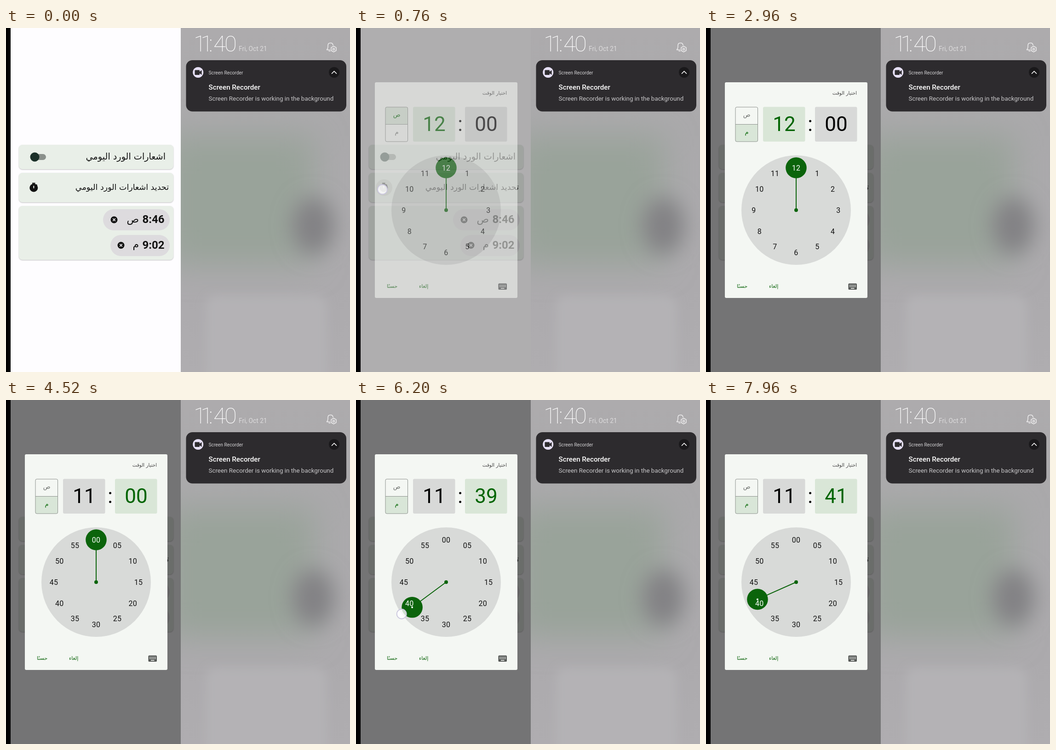
These frames come from a looping animation (748 by 748 pixels, 8 s). An HTML page:

```html
<!DOCTYPE html>
<html lang="ar">
<head>
<meta charset="utf-8">
<title>Time picker</title>
<style>
  html, body { margin: 0; width: 100%; height: 100%; overflow: hidden; background: #000; }
  svg { display: block; width: 748px; height: 748px; font-family: Roboto, "DejaVu Sans", sans-serif; }
  .ar { font-family: "DejaVu Sans", sans-serif; }
  .card { fill: #e9efe8; filter: drop-shadow(0 1px 1px rgba(0, 0, 0, .25)); }
  .chip { fill: #dddbde; }
  .mid { text-anchor: middle; }
  .end { text-anchor: end; }
  .big { font-size: 44px; text-anchor: middle; }
  .line { fill: none; stroke-linecap: round; stroke-linejoin: round; }
  .labels { font-size: 16px; text-anchor: middle; letter-spacing: .3px; }
</style>
</head>
<body>
<svg viewBox="0 0 748 748">
  <defs>
    <filter id="soft" x="-60%" y="-60%" width="220%" height="220%"><feGaussianBlur stdDeviation="34"/></filter>
    <filter id="softer" x="-80%" y="-80%" width="260%" height="260%"><feGaussianBlur stdDeviation="23"/></filter>
    <filter id="edge" x="-30%" y="-30%" width="160%" height="160%"><feGaussianBlur stdDeviation="10"/></filter>
    <linearGradient id="wall" x2="0" y2="1">
      <stop offset="0" stop-color="#adabad"/>
      <stop offset=".3" stop-color="#aaa9ab"/>
      <stop offset=".75" stop-color="#acaaad"/>
      <stop offset="1" stop-color="#afadb0"/>
    </linearGradient>
    <clipPath id="rightHalf"><path d="M380 0H748V748H380z"/></clipPath>
    <clipPath id="knobClip"><circle class="knob" r="22.8"/></clipPath>
    <g id="remove">
      <circle r="7.5" fill="#111"/>
      <path d="M-2.8-2.8 2.8 2.8M2.8-2.8-2.8 2.8" stroke="#e5e3e6" stroke-width="1.7"/>
    </g>
  </defs>

  <!-- settings screen -->
  <path d="M10 0H380V748H10z" fill="#fefdff"/>
  <rect class="card" x="28" y="254" width="336" height="53" rx="8"/>
  <rect class="card" x="28" y="315" width="336" height="64" rx="8"/>
  <rect class="card" x="28" y="387" width="336" height="117" rx="8"/>
  <rect x="55" y="274" width="32" height="13" rx="6.5" fill="#8a908b"/>
  <circle cx="62.5" cy="280.5" r="10" fill="#1b3029"/>
  <g fill="#111">
    <text class="ar end" x="347" y="286" font-size="19.2">اشعارات الورد اليومي</text>
    <text class="ar end" x="354" y="352" font-size="17.5">تحديد اشعارات الورد اليومي</text>
    <circle cx="60.3" cy="347.5" r="9"/>
    <path d="M57 336.500h6.500v2.200H57zM66 339.500l2.300 2.300-1.500 1.500-2.300-2.300z"/>
    <path d="M60.300 343v5.500" stroke="#e9efe8" stroke-width="2"/>
    <rect class="chip" x="211" y="394" width="145" height="46" rx="23"/>
    <rect class="chip" x="227" y="450" width="129" height="46" rx="23"/>
    <g font-size="24" font-weight="700" class="end">
      <text x="344.500" y="424">8:46</text>
      <text x="344.500" y="479.500">9:02</text>
    </g>
    <g class="ar end" font-size="22">
      <text x="289" y="423">ص</text>
      <text x="289" y="478">م</text>
    </g>
    <use href="#remove" x="235" y="417"/>
    <use href="#remove" x="250" y="472.500"/>
  </g>
  <circle id="ripple" cx="61" cy="347" r="18" fill-opacity=".13"/>
  <path id="scrim" d="M10 0H380V748H10z"/>

  <!-- picker dialog -->
  <g id="dialog">
    <rect x="41" y="118" width="310" height="469" rx="3" fill="#f4f7f3"/>
    <text class="ar end" x="328" y="145" font-size="10.300" fill="#444">اختيار الوقت</text>
    <path id="half" fill="#d9e6d8"/>
    <rect x="64" y="172" width="48.500" height="75" rx="3" fill="none" stroke="#8d918d"/>
    <path d="M64 209.500h48.500" stroke="#8d918d"/>
    <g class="ar mid" font-size="13">
      <text id="am" x="88.500" y="193">ص</text>
      <text id="pm" x="88.500" y="231">م</text>
    </g>
    <rect id="hourBox" x="124" y="171.500" width="91.500" height="75.500" rx="3"/>
    <rect id="minuteBox" x="237" y="171.500" width="91.500" height="75.500" rx="3"/>
    <text id="hour" class="big" x="170" y="224"></text>
    <text id="minute" class="big" x="283" y="224"></text>
    <text class="big" x="226.500" y="224">:</text>
    <circle cx="196" cy="396" r="119" fill="#d8dad8"/>
    <g class="labels" fill="#111"></g>
    <g fill="#0b640b">
      <path id="hand" stroke="#0b640b" stroke-width="2"/>
      <circle cx="196" cy="396" r="4"/>
      <circle class="knob" r="22.800"/>
    </g>
    <g clip-path="url(#knobClip)"><g class="labels" fill="#fff"></g></g>
    <circle id="pip" class="knob" r="2" fill="#fff"/>
    <g class="ar" font-size="11" fill="#0b640b">
      <text x="67" y="565">حسنًا</text>
      <text x="137" y="565">إلغاء</text>
    </g>
    <rect x="309.500" y="555.500" width="18.500" height="13.500" rx="1.800" fill="#555856"/>
    <path d="M312 559.300h14M312 562.400h14" stroke="#f4f7f3" stroke-width="1.700" stroke-dasharray="1.800 1.200"/>
    <path d="M315 566.200h7.500" stroke="#f4f7f3" stroke-width="1.700"/>
  </g>
  <circle id="touch" r="10.500" fill="#fff" fill-opacity=".8" stroke="#cbc7de" stroke-width="1.800"/>

  <!-- notification shade -->
  <g clip-path="url(#rightHalf)">
    <path d="M380 0H748V748H380z" fill="url(#wall)"/>
    <rect x="345" y="235" width="325" height="280" fill="#99a39a" filter="url(#soft)"/>
    <ellipse cx="668" cy="430" rx="45" ry="62" fill="#828184" filter="url(#softer)"/>
    <rect x="435" y="582" width="262" height="220" rx="22" fill="#b4b2b5" filter="url(#edge)"/>
  </g>
  <g fill="#fff">
    <text x="408 423 441 451 475" y="51" font-size="49" font-weight="200">11:40</text>
    <text x="506" y="50" font-size="13.800" fill="#dddcdd">Fri, Oct 21</text>
    <g class="line" stroke="#efeeef" stroke-width="1.500">
      <path d="M704 47.500H697.500Q700 45 700 41V38Q700 32.500 705.500 32.500T711 37.500M702 50h3"/>
      <path d="M712.500 39.500 718 42.700V49L712.500 52 707 49V42.700z"/>
      <circle cx="712.500" cy="46" r="2"/>
    </g>
    <rect x="391.500" y="70" width="348.500" height="111.500" rx="14" fill="#2d2b2e"/>
    <circle cx="417.700" cy="96.500" r="11.500" fill="#e6e0f6"/>
    <path d="M410.500 92.500q0-1 1-1h8.500q1 0 1 1v2.500l4.500-3.500v10.500l-4.500-3.500v2.500q0 1-1 1h-8.500q-1 0-1-1z" fill="#2d2b2e"/>
    <circle cx="713.500" cy="96.500" r="11.500" fill="#19181a"/>
    <path class="line" d="M708.500 99l5-5 5 5" stroke="#fff" stroke-width="1.700"/>
    <text x="440.500" y="100.500" font-size="10.250" fill="#d5d4d6">Screen Recorder</text>
    <text x="440.500" y="133.500" font-size="15.200" font-weight="500">Screen Recorder</text>
    <text x="440.500" y="158" font-size="13.400" fill="#c9c8ca">Screen Recorder is working in the background</text>
  </g>
</svg>
<script>
const DURATION = 8000, CENTER = { x: 196, y: 396 };
const PM_AT = 2120, HOUR_AT = 3640, MINUTES_AT = 3840;
const GREEN = '#006400';

// Dragged minute value over time: [ms, minutes]
const DRAG = [[4760, 0], [5200, 12], [5640, 27.9], [6200, 38.9], [6700, 41]];
const DRAG_END = 7240;
// Single taps: [from, to, x, y]
const TAPS = [[600, 800, 57.5, 351], [2000, 2160, 88, 230], [3600, 3840, 149, 316]];

const $ = id => document.getElementById(id);
const clamp = v => Math.min(1, Math.max(0, v));
const ramp = (t, from, to) => clamp((t - from) / (to - from));
const pad = n => String(n).padStart(2, '0');
const set = (el, attrs) => { for (const k in attrs) el.setAttribute(k, attrs[k]); };

function polar(degrees, radius) {
  const a = degrees * Math.PI / 180;
  return { x: CENTER.x + radius * Math.sin(a), y: CENTER.y - radius * Math.cos(a) };
}

function keyed(points, t) {
  let value = points[0][1];
  for (let i = 1; i < points.length; i++) {
    const [t0, v0] = points[i - 1], [t1, v1] = points[i];
    if (t >= t0) value = v0 + (v1 - v0) * ramp(t, t0, t1);
  }
  return value;
}

const labelGroups = [...document.querySelectorAll('.labels')];
for (const group of labelGroups) {
  for (let i = 0; i < 12; i++) {
    const { x, y } = polar(i * 30, 92);
    const text = document.createElementNS('http://www.w3.org/2000/svg', 'text');
    set(text, { x, y: y + 5.5 });
    group.append(text);
  }
}
const knobs = document.querySelectorAll('.knob');

function styleField(name, value, active) {
  set($(name + 'Box'), { fill: active ? '#d9e6d7' : '#d8d9d8' });
  set($(name), { fill: active ? GREEN : '#000' });
  $(name).textContent = value;
}

function drawTouch(t, dragAngle) {
  let touch = TAPS.find(([from, to]) => t >= from - 40 && t < to + 80);
  if (t >= DRAG[0][0] && t < DRAG_END + 80) {
    const p = polar(dragAngle + 1, 119);
    touch = [DRAG[0][0], DRAG_END, p.x, p.y];
  }
  if (!touch) return set($('touch'), { opacity: 0 });
  const [from, to, cx, cy] = touch;
  set($('touch'), { cx, cy, opacity: ramp(t, from - 40, from) * (1 - ramp(t, to, to + 80)) });
}

function render(t) {
  const shown = ramp(t, 680, 820);
  set($('scrim'), { 'fill-opacity': .54 * shown });
  set($('dialog'), { opacity: shown });
  set($('ripple'), { opacity: ramp(t, 600, 680) * (1 - ramp(t, 780, 980)) });

  const isPm = t >= PM_AT, minutesMode = t >= MINUTES_AT;
  set($('half'), { d: `M64 ${isPm ? 209.5 : 172}h48.5v37.5H64z` });
  set($('am'), { fill: isPm ? '#6b6e6b' : GREEN });
  set($('pm'), { fill: isPm ? GREEN : '#6b6e6b' });

  const minutes = keyed(DRAG, t);
  styleField('hour', t < HOUR_AT ? 12 : 11, !minutesMode);
  styleField('minute', pad(Math.round(minutes)), minutesMode);

  for (const group of labelGroups)
    [...group.children].forEach((label, i) => {
      label.textContent = minutesMode ? pad(i * 5) : i || 12;
    });

  let angle = t < HOUR_AT ? 0 : 330;
  if (minutesMode) {
    const settle = 1 - ramp(t, MINUTES_AT, MINUTES_AT + 200);
    angle = minutes * 6 - 30 * settle * settle;
  }
  const knob = polar(angle, 92);
  knobs.forEach(el => set(el, { cx: knob.x, cy: knob.y }));
  set($('hand'), { d: `M${CENTER.x} ${CENTER.y}L${knob.x} ${knob.y}` });
  set($('pip'), { opacity: Math.round(angle) % 30 ? 1 : 0 });
  drawTouch(t, minutes * 6);
}

const start = performance.now();
function tick() {
  render((performance.now() - start) % DURATION);
  requestAnimationFrame(tick);
}
tick();
</script>
</body>
</html>
```
